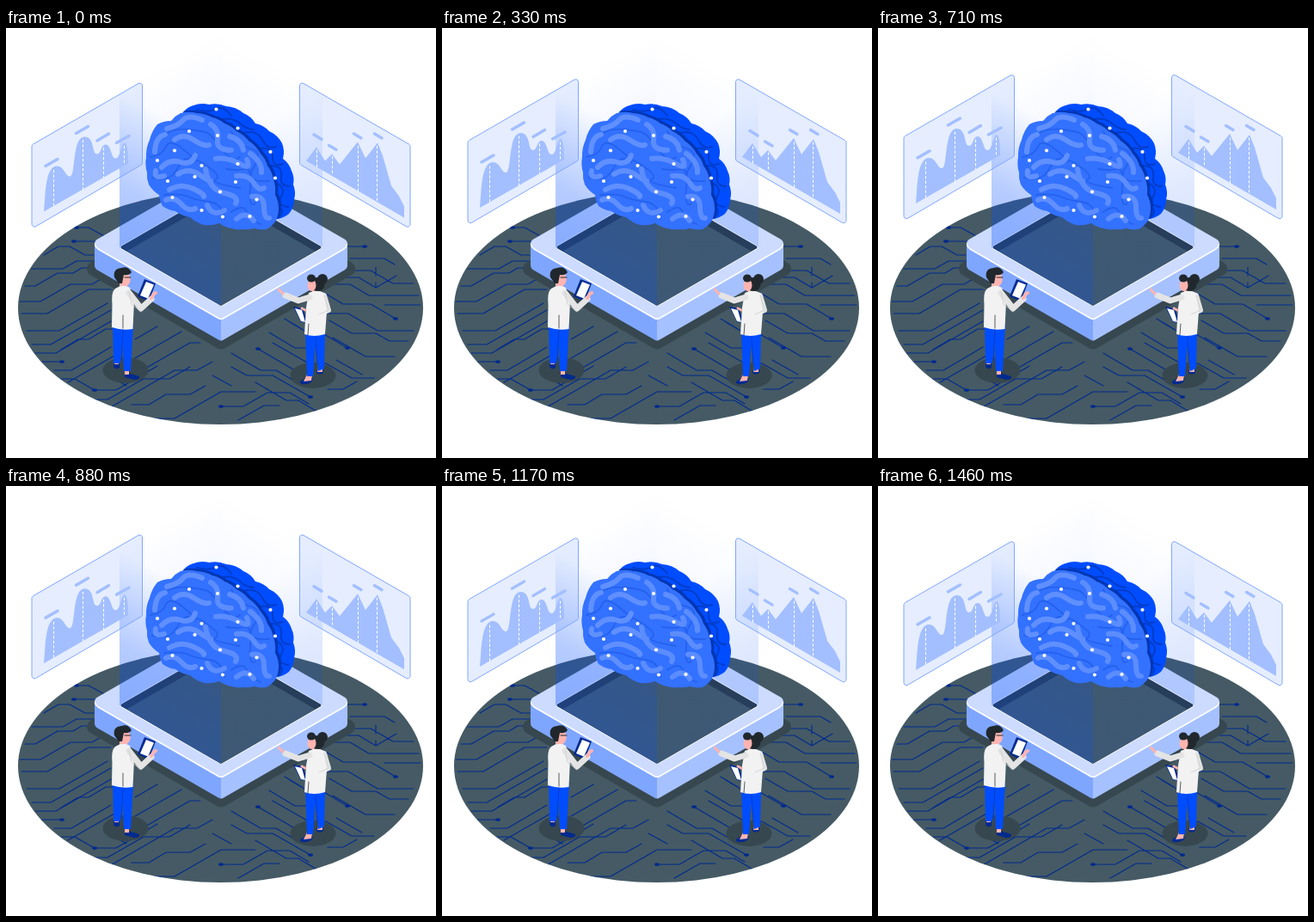
Write an HTML page with a canvas that moves like this. It is 500 px wide and 500 px high and loops after 1.5 s.

```html
<!DOCTYPE html>
<html lang="en">
<head>
<meta charset="utf-8">
<style>
html, body { margin: 0; width: 100%; height: 100%; overflow: hidden; background: #fff; }
canvas { display: block; width: 500px; height: 500px; }
</style>
</head>
<body>
<canvas id="stage"></canvas>
<script>
const canvas = document.getElementById('stage');
const ratio = window.devicePixelRatio || 1;
canvas.width = canvas.height = 500 * ratio;

const ISO = Math.tan(Math.PI / 6);
const BLUE = '#004dff', NAVY = '#002a8f', FLOOR = '#455a64', SHADOW = '#37474f';
const SKIN = '#ffb4b0', COAT = '#f2f2f2', SLEEVE = '#e4e4e4', HAIR = '#20282d';
const tint = alpha => `rgba(0,77,255,${alpha})`;

let ctx = canvas.getContext('2d');

function fill(path, color) {
  ctx.fillStyle = color;
  ctx.fill(new Path2D(path));
}

function stroke(path, color, width) {
  ctx.strokeStyle = color;
  ctx.lineWidth = width;
  ctx.lineCap = ctx.lineJoin = 'round';
  ctx.stroke(new Path2D(path));
}

function oval(x, y, rx, ry, color) {
  ctx.beginPath();
  ctx.ellipse(x, y, rx, ry, 0, 0, Math.PI * 2);
  ctx.fillStyle = color;
  ctx.fill();
}

function clipped(path, draw) {
  ctx.save();
  ctx.clip(path);
  draw();
  ctx.restore();
}

function rounded(points, r) {
  const path = new Path2D(), n = points.length;
  const [a, b] = [points[n - 1], points[0]];
  path.moveTo((a[0] + b[0]) / 2, (a[1] + b[1]) / 2);
  points.forEach((p, i) => path.arcTo(...p, ...points[(i + 1) % n], r));
  path.closePath();
  return path;
}

const diamond = (cy, w, r) =>
  rounded([[250 - w, cy], [250, cy - w * ISO], [250 + w, cy], [250, cy + w * ISO]], r);

// Closed outline whose edges bulge outwards like a cloud.
function scallop(points, bulge) {
  const path = new Path2D();
  path.moveTo(...points[0]);
  points.forEach(([x, y], i) => {
    const [u, v] = points[(i + 1) % points.length];
    path.quadraticCurveTo((x + u) / 2 + (v - y) * bulge, (y + v) / 2 - (u - x) * bulge, u, v);
  });
  path.closePath();
  return path;
}

const circuitsLeft = [
  'M79 248H104 M82 232H96L118 244 M44 264L61 254H74L92 264H102 M30 280H66L82 271H103',
  'M22 300H34L60 285H78L88 279H105 M16 318H40L75 298H100L112 291 M18 332H48L96 304H122',
  'M24 352H62L118 320 M30 368H52L122 328 M65 388H42 M34 378H58L122 341',
  'M56 398H76L122 371 M72 412L126 381 M103 421L80 408H64 M103 421H128L176 393',
  'M92 432H118L160 408H190L214 394 M120 442L196 398H222L240 388 M127 392V408L140 416',
  'M172 454H196L250 423H290 M150 362L176 347 M150 384L204 353 M160 397L214 366H226',
  'M157 398V409 M146 438H166L186 426H214L232 416 M130 350H116L96 362H84L64 374',
].join(' ');
const circuitsRight = [
  'M417 254H397L376 242 M378 250H366 M400 268H440L452 275 M398 282H424L450 297H474',
  'M388 290H410L430 302L454 288 M380 298H400L422 311H480 M430 302V296 M370 308L392 321H424L453 338',
  'M352 320L372 332H398L432 352H474 M397 372L368 355H352L330 342 M324 338L344 350',
  'M293 373L334 397 M310 366L352 390H372L402 407H428 M306 354L336 372H350 M380 360L418 382H452',
  'M354 429L310 404H280L262 394 M250 440H276L304 424H330L352 437 M270 456L300 439H318',
  'M262 378L296 398H314L338 412 M384 386L414 403 M374 420H392L408 411 M290 412L326 433H340L360 445',
  'M376 340L402 355H430L446 364H468 M240 404L262 416 M440 322H482 M430 278V288',
].join(' ');
const circuitDots = [[82, 232], [79, 248], [65, 388], [103, 421], [250, 440], [354, 429],
  [397, 372], [453, 338], [417, 254], [378, 250], [293, 373], [127, 392]];

function drawFloor() {
  const disc = new Path2D();
  disc.ellipse(249.5, 325.5, 235.5, 135.5, 0, 0, Math.PI * 2);
  ctx.fillStyle = FLOOR;
  ctx.fill(disc);
  clipped(disc, () => {
    stroke(circuitsLeft, NAVY, 1.1);
    stroke(circuitsRight, NAVY, 1.1);
    circuitDots.forEach(([x, y]) => oval(x, y, 3, 1.8, NAVY));
  });
}

function drawPlatform() {
  const top = diamond(251, 153, 6), base = diamond(276, 153, 6), hole = diamond(255, 119, 2);
  ctx.fillStyle = SHADOW;
  ctx.fill(diamond(280, 164, 8));
  [[103, '#7fa6ff'], [250, '#a6c1ff']].forEach(([x, color]) => {
    const half = new Path2D();
    half.rect(x, 150, 147, 230);
    clipped(half, () => {
      ctx.fillStyle = color;
      ctx.fill(base);
      ctx.fillRect(x, 251, 147, 25);
    });
  });
  ctx.fillStyle = '#ccdbff';
  ctx.fill(top);
  stroke('M103.5 252Q104 255 107 257L247 337.5Q250 339 253 337.5L393 257Q396 255 396.5 252', '#fff', 1.5);
  clipped(hole, () => {
    ctx.fillStyle = '#2b3c48';
    ctx.fill(hole);
    ctx.fillStyle = FLOOR;
    ctx.fill(diamond(265, 119, 2));
  });
  ctx.strokeStyle = '#fff';
  ctx.lineWidth = 1;
  ctx.stroke(hole);
}

// One upright sheet of light, sheared along an isometric axis.
function lightSheet(x, y, slope, alpha) {
  ctx.save();
  ctx.transform(1, slope, 0, 1, x, y);
  const glow = ctx.createLinearGradient(0, 0, 0, -182);
  glow.addColorStop(0, tint(alpha));
  glow.addColorStop(0.4, tint(alpha * 0.85));
  glow.addColorStop(1, tint(0));
  ctx.fillStyle = glow;
  ctx.fillRect(0, -182, 118, 182);
  ctx.restore();
}

function drawBeam() {
  lightSheet(132, 255, -ISO, 0.06);
  lightSheet(250, 187, ISO, 0.04);
  lightSheet(132, 255, ISO, 0.29);
  lightSheet(250, 323, -ISO, 0.11);
}

const frontLobe = scallop([[176, 112], [192, 108], [203, 99], [222, 99], [240, 104], [254, 111],
  [268, 120], [282, 131], [296, 146], [304, 160], [311, 176], [313, 194], [317, 208], [314, 224],
  [303, 234], [288, 233], [276, 234], [262, 233], [248, 227], [230, 229], [214, 220], [197, 213],
  [182, 207], [178, 194], [166, 182], [164, 168], [163, 150], [167, 130]], 0.12);
const backLobe = scallop([[206, 98], [218, 90], [236, 89], [256, 91], [276, 99], [290, 111],
  [306, 120], [321, 134], [322, 152], [332, 166], [334, 182], [335, 200], [329, 216], [314, 222],
  [300, 230], [250, 200], [220, 130]], 0.17);
const backGrooves = 'M222 95Q236 99 244 94T262 102 M250 106Q264 104 272 111T288 118 ' +
  'M276 122Q292 118 298 130T314 138 M296 140Q310 138 310 150T322 158 M308 160Q322 160 320 172T330 184 ' +
  'M314 180Q326 186 320 196T328 208 M318 208Q324 214 318 220';
const ridgesLeft = 'M173 144Q174 126 185 124 M187 117Q200 114 206 107T228 107 M196 130Q206 122 218 130T236 136 ' +
  'M181 162Q190 152 203 156T220 148 M174 166Q172 176 184 172 M200 170Q212 162 224 170T238 178 ' +
  'M190 188Q204 180 218 187T230 196 M186 200Q196 196 204 205T220 210';
const ridgesRight = 'M238 112Q248 118 246 130T262 142 M260 126Q274 130 276 142 M244 152Q258 150 272 158T280 153 ' +
  'M284 146Q298 156 297 168 M232 164Q236 188 254 192T267 204 M268 172Q282 170 288 180T300 186 ' +
  'M286 196Q300 194 300 208T306 221 M234 206Q240 220 254 212 M268 222Q280 212 288 224';
const grooves = 'M168 150Q182 148 186 138T206 141T220 156 M182 126Q192 116 212 118T236 123T252 142T272 150 ' +
  'M170 174Q192 180 200 162T230 158T244 176T272 186 M184 194Q204 192 212 196T236 202T254 222 ' +
  'M262 120Q268 136 284 140T288 162T306 178 M256 164Q270 166 278 164T284 186T290 204 M262 214Q276 204 280 214T296 228';
const sparks = [[213, 120], [246, 125], [269.5, 158], [227.5, 160], [196, 142.5], [176, 154], [219.5, 173],
  [188, 178], [193.5, 197], [227.5, 212], [249, 190.5], [267, 179], [291.5, 199.5], [283.5, 219],
  [252, 219.5], [244.5, 94.5], [269.5, 116.5], [307.5, 144], [313, 174.5]];

function drawBrain() {
  ctx.fillStyle = BLUE;
  ctx.fill(backLobe);
  clipped(backLobe, () => {
    stroke(backGrooves, '#003cc8', 2);
    ctx.translate(3, -2);
    ctx.fillStyle = '#0036b3';
    ctx.fill(frontLobe);
  });
  ctx.fillStyle = '#3371ff';
  ctx.fill(frontLobe);
  clipped(frontLobe, () => {
    stroke(grooves, '#2462ed', 1.8);
    stroke(ridgesLeft, '#6090ff', 6);
    stroke(ridgesRight, '#5c8dff', 6);
  });
  sparks.forEach(([x, y]) => oval(x, y, 2.1, 2.1, '#fff'));
}

const charts = [
  {
    frame: [[30, 136.5], [158.5, 62.5], [158.5, 159], [30, 234]],
    area: 'M44 214C46 196 45 162 59 161C68 161 69 174 75 173C81 170 77 128 91 127C104 127 99 147 106 147' +
      'C111 147 110 136 116 136C123 137 122 153 128 152C133 151 134 135 138 134Q142 136 142 158Z',
    bars: 'M46 161L60 153 M81.5 123L95.5 115 M106 131.5L119.5 123.5 M128.5 134L143 126',
    dashes: 'M55.5 166V208 M89.5 131V188 M113.5 140V174 M137.5 138V160'
  },
  {
    frame: [[341.5, 62.5], [470, 136.5], [470, 234], [341.5, 159]],
    area: 'M349 155L361 139L371 155L379 147L388 159L409 133L418 152L432 134L438 149L448 184L457 196L463 208V221Z',
    bars: 'M358 124.5L367 130 M375.5 137L384 142 M404.5 123.5L413 128.5 M428.5 123.5L437 128.5',
    dashes: 'M361.5 143V162 M379.5 150V172 M409.5 138V190 M431.5 138V202'
  }
];

function drawChart({ frame, area, bars, dashes }) {
  const panel = rounded(frame, 3);
  ctx.fillStyle = tint(0.1);
  ctx.fill(panel);
  ctx.strokeStyle = '#80a6ff';
  ctx.lineWidth = 1;
  ctx.stroke(panel);
  fill(area, '#a3bfff');
  stroke(bars, '#a3bfff', 3.4);
  ctx.setLineDash([2.5, 3]);
  stroke(dashes, '#fff', 1);
  ctx.setLineDash([]);
}

function drawMan() {
  oval(139, 398, 26.5, 15, SHADOW);
  fill('M125 388H132V395Q128 398 125 394Z M138 400L145 402L155 405Q156 409 149 409L138 406Z', NAVY);
  fill('M138 396H143V403H138Z M126 386H131V391H126Z', SKIN);
  fill('M124 345H137L133 390H125Z M134 345H148L145 399H137Z', BLUE);
  stroke('M136 350L134 386', '#003cc8', 1);
  fill('M161 292L174 297L166 318L153 312Z', NAVY);
  fill('M163 295L172 298.5L165 314.5L156 311Z', '#fff');
  fill('M132 294L141 295L141 303L132 304Z', SKIN);
  oval(139, 292, 5.7, 8, SKIN);
  fill('M127 303Q136 297 144 302L149 318L147.5 350Q135 352 123 348L123.5 322Q122 307 127 303Z', COAT);
  stroke('M143 308L157 326L169 315', SLEEVE, 7);
  stroke('M143 307L146 321L157 330', '#ccc', 0.8);
  stroke('M136 334V349', '#333', 0.8);
  stroke('M169 314L172 309L174 308', SKIN, 4);
  fill('M126 290Q124 280 134 279Q142 276 146 284Q143 288 137 287L135 297L131 297Z', HAIR);
  stroke('M138 290H145', HAIR, 1);
}

function drawWoman() {
  oval(357, 404, 26.5, 15, SHADOW);
  fill('M342 411L350 406L357 408L355 412Q347 416 342 413Z M361 398L369 397V401Q365 404 361 401Z', NAVY);
  fill('M350 403H356L355 410L346 411Z M363 396H368V400H362Z', SKIN);
  fill('M348 354H361L357 405H350Z M358 354H371L370 396L363 399Z', BLUE);
  stroke('M360 360L362 390', '#003cc8', 1);
  fill('M334 324L345 326L351 343L343 342Z', NAVY);
  fill('M336 326L344 328L348 342L343 341Z', '#fff');
  fill('M356 302H363V309H356Z', SKIN);
  stroke('M370 311L375 328L364 333', SLEEVE, 6);
  fill('M352 308Q362 303 370 308L373 330L371 356Q358 360 347 356L349 325Z', COAT);
  stroke('M353 313L340 317L325 311', SLEEVE, 7);
  stroke('M370 311L375 328L364 333', '#ccc', 0.8);
  stroke('M352 344L351 357', '#333', 0.8);
  stroke('M322 309L317 304 M344 326L348 328', SKIN, 3);
  oval(362, 298, 8.5, 8, HAIR);
  oval(355.5, 299, 5, 7, SKIN);
  oval(355, 291, 5, 4.5, HAIR);
  oval(368, 292, 6, 6, HAIR);
}

// Everything except the floating charts stands still, so it is painted once.
function layer(draw) {
  const sheet = document.createElement('canvas'), screen = ctx;
  sheet.width = sheet.height = canvas.width;
  ctx = sheet.getContext('2d');
  ctx.scale(ratio, ratio);
  draw();
  ctx = screen;
  return sheet;
}

const scene = layer(() => {
  ctx.fillStyle = '#fff';
  ctx.fillRect(0, 0, 500, 500);
  drawFloor();
  drawPlatform();
  drawBeam();
  drawBrain();
  drawMan();
  drawWoman();
});

const LOOP = 1500, STEPS = 36, LIFT = 10;

function render(now) {
  const step = Math.floor(((now + 5) % LOOP) / LOOP * STEPS);
  const phase = ((step + 1) % STEPS) / STEPS;
  const lift = LIFT * (1 - Math.abs(2 * phase - 1));
  ctx.setTransform(1, 0, 0, 1, 0, 0);
  ctx.drawImage(scene, 0, 0);
  ctx.setTransform(ratio, 0, 0, ratio, 0, -lift * ratio);
  charts.forEach(drawChart);
}

const start = performance.now();
function tick() {
  render(performance.now() - start);
  requestAnimationFrame(tick);
}
tick();
</script>
</body>
</html>
```
